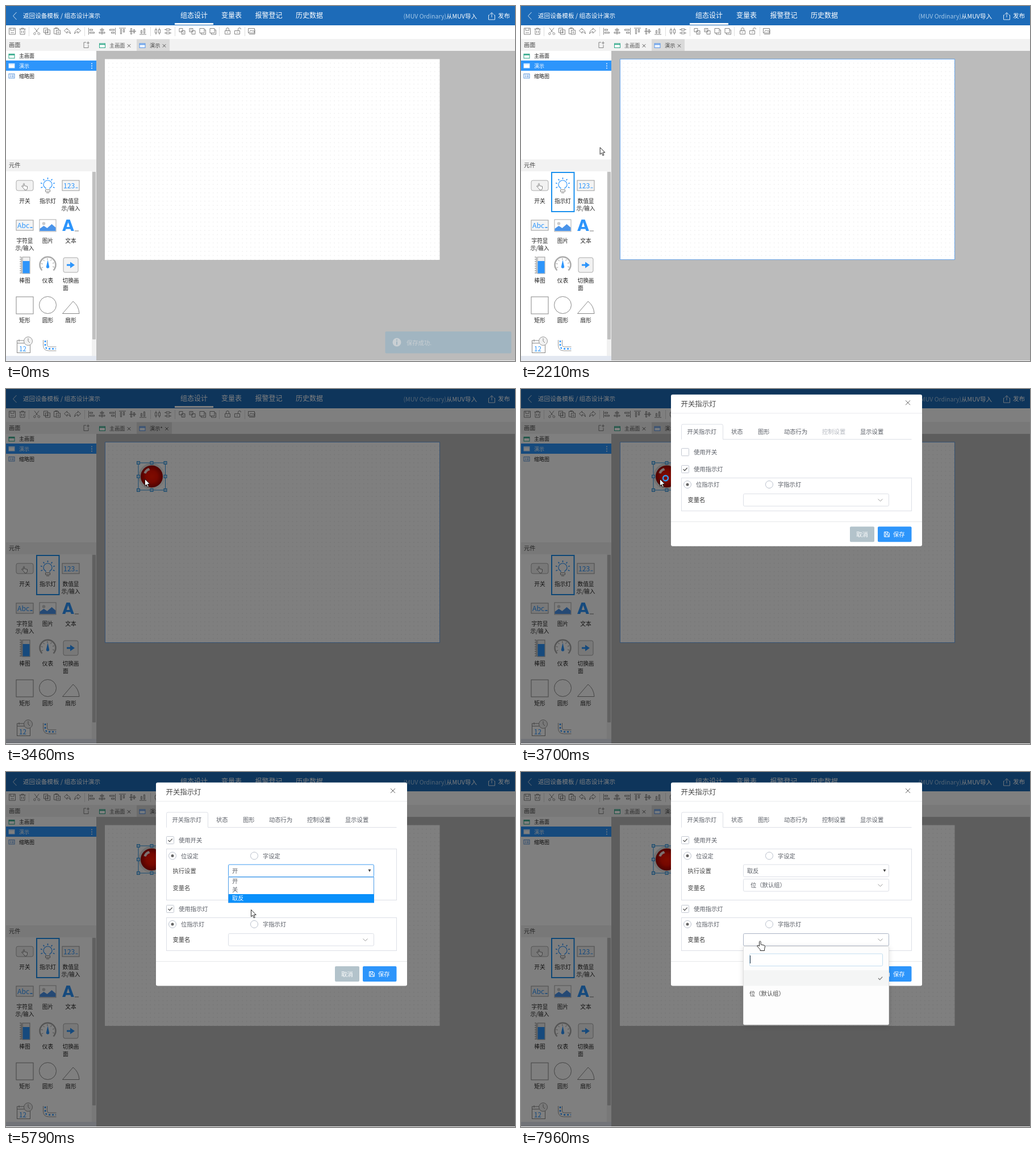
These frames come from a looping animation (896 px wide and 625 px high, 8 s). An HTML page:

```html
<!DOCTYPE html>
<html lang="zh-CN">
<head>
<meta charset="utf-8">
<title>组态设计演示</title>
<style>
html, body { margin: 0; width: 100%; height: 100%; overflow: hidden; background: #fff; }
svg { display: block; font-family: "Noto Sans CJK SC", "Noto Sans CJK", "Noto Sans", sans-serif; }
text { white-space: pre; }
#dd { filter: drop-shadow(0 2px 4px rgba(0,0,0,.14)); }
</style>
</head>
<body>
<svg id="stage" width="896" height="625"></svg>
<script>
const LOOP = 8000, BLUE = '#2d95fb', GREY = '#777', INK = '#5a5e66', EDGE = '#dcdfe6';
const stage = document.getElementById('stage');

// Markup helpers; text is placed by its vertical centre.
const T = (x, y, s, size = 10.3, fill = INK, extra = '') =>
  `<text x="${x}" y="${y + size * .37}" font-size="${size}" fill="${fill}" ${extra}>${s}</text>`;
const R = (x, y, w, h, fill, stroke = 'none', extra = '') =>
  `<rect x="${x}" y="${y}" width="${w}" height="${h}" fill="${fill}" stroke="${stroke}" ${extra}/>`;
const C = (x, y, r, fill, stroke = 'none', extra = '') =>
  `<circle cx="${x}" cy="${y}" r="${r}" fill="${fill}" stroke="${stroke}" ${extra}/>`;
const P = (d, stroke = GREY, extra = '') => `<path d="${d}" fill="none" stroke="${stroke}" ${extra}/>`;
const G = (x, y, body, extra = '') => `<g transform="translate(${x} ${y})" ${extra}>${body}</g>`;
const cross = (x, y, r, col = '#555') => P(`M${x - r} ${y - r}l${2 * r} ${2 * r}m0 ${-2 * r}l${-2 * r} ${2 * r}`, col);
const tick = (x, y, col) => P(`M${x - 3.5} ${y}l2.6 2.6 4.6 -5`, col, 'stroke-width="1.3"');

function header() {
  const nav = [[307, '组态设计'], [379, '变量表'], [438.5, '报警登记'], [510, '历史数据']];
  return R(0, 0, 896, 34, '#1d6bb8') + P('M18.5 11L12.5 17.5L18.5 24', '#d5e5f4') +
    T(30, 17, '返回设备模板 / 组态设计演示', 10.6, '#fff') +
    nav.map(([x, s]) => T(x, 17, s, 12, '#fff')).join('') + R(297, 30, 68, 3, '#fff') +
    T(775, 18, '(MUV Ordinary)', 10.6, '#a5c8e8', 'text-anchor="end"') +
    T(775, 18, '从MUV导入', 10.6, '#fff') +
    P('M851 16h-1.5v8h11v-8h-1.5M855 20v-8M851.8 15l3.2-3.5 3.2 3.5', '#dce9f5') +
    T(866, 17, '发布', 10.6, '#fff');
}

function toolbar() {
  const bars = 'M-5.5 -6v12M-3.5 -3.5h5v2h-5zM-3.5 1.5h8v2h-8z';
  const turned = (x, a, d) => G(x, 44.5, `<g transform="rotate(${a})">${P(d)}</g>`);
  const mid = 'M0 -6v12M-3 -3.5h6v2h-6zM-5 1.5h10v2h-10z';
  const pair = 'M-5 -5h6v6h-6zM-1 -1h6v6h-6z';
  const sheet = 'M-5 -5h8v8h-8zM-2.5 3v2.5h8v-8h-2.5';
  const lock = 'M-4.5 -1h9v6h-9zM0 1v2', bow = 'v-2.5a2.5 2.5 0 0 1 5 0';
  const icons = [
    [11, 'M-5.5 -5.5h11v11h-11zM-3 -5.5v4h6v-4M-3 2.5h6'],
    [29, 'M-5.5 -4h11M-2 -4v-1.5h4v1.5M-4 -4v9.5h8v-9.5M-1.5 -1v4M1.5 -1v4'],
    [54, 'M-4 -6l6 8M4 -6l-6 8M-2 3.5a1.8 1.8 0 1 1 -.1 -.2M5.5 3.5a1.8 1.8 0 1 1 -.1 -.2'],
    [72, 'M-5.5 -5.5h7v8h-7zM-2.5 -2.5h8v8h-8zM-.5 1.5h4M1.5 -.5v4'],
    [90, 'M-1.5 4.5h-4v-9.5h8v3M-3.5 -5v-1h4v1M-1.5 -2h7v7.5h-7zM.5 1h3M.5 3h3'],
    [108, 'M-5.5 -1l5 -4.5v2.5q5 0 6 7.5q-2.5 -4 -6 -4v3z'],
    [126, 'M5.5 -1l-5 -4.5v2.5q-5 0 -6 7.5q2.5 -4 6 -4v3z'],
    [151, bars], [169, mid],
    [267, 'M-4.5 -3h3v6h-3zM1.5 -3h3v6h-3zM-3 -6v3M-3 3v3M3 -6v3M3 3v3'],
    [285, 'M-3 -4.5h6v3h-6zM-3 1.5h6v3h-6zM-6 -3h3M3 -3h3M-6 3h3M3 3h3'],
    [310, pair + 'M1 4l3 -3'], [328, pair + 'M-4 -1l3 -3'], [346, sheet], [364, sheet],
    [390, lock + 'M-2.5 -1' + bow + 'v2.5'], [407, lock + 'M1.5 -1' + bow],
    [432, 'M-5.5 -5h11v8h-11zM-4 5h10v-8M-4 2l3 -4 2.5 2 1.5 -1.5 2 3']
  ];
  return R(0, 34, 896, 24, '#fff') + `<g stroke-width=".9">` +
    icons.map(([x, d]) => G(x, 44.5, P(d))).join('') +
    turned(187, 180, bars) + turned(205, 90, bars) + turned(223, 90, mid) + turned(241, -90, bars) + '</g>' +
    [40.5, 138.5, 254.5, 297.5, 375.5, 420.5].map(x => P(`M${x} 37v16`, '#ddd')).join('');
}

const win = (x, y, col, fill = '#fff') =>
  R(x - 5, y - 3.5, 10, 7.5, fill, col) + P(`M${x - 5} ${y - 2}h10`, col, 'stroke-width="1.6"');

function sidebar() {
  return R(0, 58, 896, 21, '#f2f2f2') + R(0, 79, 159, 546, '#fff') + T(5, 68.5, '画面', 10.2, '#444') +
    P('M141 64h-4v9.5h8v-5M142 65h5M144.5 62.5v5', GREY, 'stroke-width=".9"') +
    win(10, 88, '#2aa586') + T(23, 88, '主画面', 9, '#222') +
    R(0, 96, 159, 18, BLUE) + win(10, 105, '#d5eaff', '#fff') + T(23, 105.5, '演示', 9, '#fff') +
    [101.5, 105.5, 109.5].map(y => C(151, y, .9, '#fff')).join('') +
    R(5, 119.5, 10, 7.5, '#fff', '#5a96dc') + P('M7 122h2M10 122h3.5M7 124.5h2M10 124.5h3.5', '#3f83d8') +
    T(23, 123.5, '缩略图', 9, '#222') +
    R(0, 270, 159, 21, '#f2f2f2') + T(5, 280.5, '元件', 10.2, '#444') +
    R(151, 291, 8, 325, '#f1f1f1') + R(152, 292, 6, 295, '#c1c1c1', 'none', 'rx="1"') +
    R(0, 616, 159, 9, '#e3e8f1') + parts();
}

function parts() {
  const cols = [33, 73.5, 114], plate = R(-15, -9, 30, 18, '#f4f4f4', '#999');
  const ring = (n, f) => Array.from({ length: n }, (_, i) => f(i)).join('');
  const ray = (a, r, len, dy = 0) =>
    `M${Math.cos(a) * r} ${Math.sin(a) * r + dy}l${Math.cos(a) * len} ${Math.sin(a) * len}`;
  const icons = [
    [0, 316, R(-15, -9, 30, 18, '#f2f2f2', '#aaa', 'rx="3"') +
      '<path d="M-1.5 5.5l-4 -4q0 -1.5 2 -.5l1 1v-5q1 -1.5 2 0v3.5l5 1v4l-1.5 2.5h-3z" fill="#fff" stroke="#777" stroke-width=".9"/>'],
    [1, 316, P('M-3.5 6v-1.5q-4 -2.2 -4 -6a7.5 7.5 0 0 1 15 0q0 3.8 -4 6v1.5', BLUE, 'stroke-width="1.2"') +
      P(ring(7, i => ray(Math.PI * (i / 4.8 - 1.125), 10, 3, -1)), BLUE, 'stroke-width="1.5"') +
      P('M-4 7.5h8v3.5h-8zM-2.5 13h5', '#888')],
    [2, 316, plate + T(-13, .5, '123', 12.2, BLUE) + P('M8.5 4h4', BLUE)],
    [0, 386, plate + T(-13, .5, 'Abc', 12.2, BLUE) + P('M9.5 4h4', BLUE, 'stroke-width="1.6"')],
    [1, 386, R(-14.5, -10, 29, 21, '#fff', '#aaa') + C(-7, -3, 2.8, '#ccc') +
      '<path d="M-14 10v-4l7 -5 6 4 8 -7 7 6v6z" fill="#4a94ea"/>'],
    [2, 386, T(-15, -.5, 'A', 27, BLUE, 'font-weight="800" font-family="DejaVu Sans, sans-serif"') + P('M7 10h7', '#777')],
    [0, 456, R(-4, -14, 13, 29, '#f0f0f0', '#999') + R(-3.5, -7, 12, 21.5, BLUE) +
      P('M-6 -14v29' + ring(8, i => `M-9 ${-14 + i * 4}h3`), '#888')],
    [1, 456, P('M-10 9.5A14 14 0 1 1 10 9.5', '#aaa', 'stroke-width="2.5"') +
      P(ring(7, i => ray(2.7 + i * .65, 9, 3)), '#999') +
      `<path d="M0 -9l2.7 12a2.7 2.7 0 1 1 -5.4 0z" fill="${BLUE}"/>`],
    [2, 456, R(-13, -13, 26, 26, '#f2f2f2', '#aaa', 'rx="3"') + `<path d="M-7 -1.5h6v-4l8 5.5 -8 5.5v-4h-6z" fill="${BLUE}"/>`],
    [0, 526.5, R(-15, -14.5, 30, 30, '#fff', '#888')],
    [1, 526.5, C(0, 0, 15, '#fff', '#888')],
    [2, 526.5, P('M-14.5 15L4 -6.5Q14 1 15 15z', '#888')],
    [0, 597, R(-13.5, -8, 23, 21.5, '#fff', '#888') + P('M-13.5 -3.5h23M-10 -10v4', '#888') + T(-10, 6.5, '12', 11.5, BLUE) +
      C(6, -7, 7.5, '#f2f2f2', '#999') + P('M6 -12v5l3 3', '#888')],
    [1, 597, P('M-8 -9v9q0 10 10 10h13M-1 -9v9q0 3 4 3h12', '#999') +
      P('M-4.5 -8v8q0 6.5 6 6.5h13', BLUE, 'stroke-width="2.5" stroke-dasharray="3 3"')]
  ];
  const labels = [
    [343.5, '开关', '指示灯', '数值显'], [356, '', '', '示/输入'], [413.5, '字符显', '图片', '文本'], [426, '示/输入', '', ''],
    [483.5, '棒图', '仪表', '切换画'], [496, '', '', '面'], [553.5, '矩形', '圆形', '扇形']
  ];
  return icons.map(([c, y, s]) => G(cols[c], y, s)).join('') +
    labels.map(([y, ...row]) => row.map((s, c) =>
      s === '面' ? T(100, y, s, 9.7, '#222') : T(cols[c], y, s, 9.7, '#222', 'text-anchor="middle"')).join('')).join('');
}

function canvas() {
  const handles = [];
  for (const x of [233, 256.5, 280.5]) for (const y of [130, 154, 178])
    if (x !== 256.5 || y !== 154) handles.push(R(x - 2.5, y - 2.5, 5, 5, '#b5dbf7', '#2f95e0'));
  return R(159, 79, 737, 545, '#bbb') +
    win(169.5, 69.5, '#2aa586') + T(182, 69.5, '主画面', 9.2, '#555') + cross(216.5, 70, 2.7) +
    R(230, 58.5, 58, 20.5, '#dadada', 'none', 'id="tab"') + win(240, 69.5, '#5a96e6', '#eaf3ff') +
    T(253, 69.5, '演示<tspan id="star">*</tspan>', 9.2, '#444') + G(0, 0, cross(278.5, 70, 2.7), 'id="tabX"') +
    R(174, 93.5, 589.5, 353.5, '#fff') + R(174, 93.5, 589.5, 353.5, 'url(#dots)') +
    R(174.5, 93.5, 589, 353, 'none', '#6aa5e8', 'id="focus"') +
    G(256.5, 154, C(0, 0, 23.5, 'url(#rim)') + C(0, 0, 19.5, 'url(#red)') +
      '<path d="M-14 -6q2 -7 9 -9l2 4q-5 1 -7 6z" fill="#fff" opacity=".88"/>', 'id="lamp"') +
    `<g id="sel">${R(233, 130, 47.5, 48, 'none', '#2f95e0')}${handles.join('')}</g>` +
    R(54, 293, 39.5, 69, 'none', '#1a90ee', 'id="picked" stroke-width="2"') +
    `<g id="toast">${R(667.5, 573, 222, 38.5, '#a1b5c1', 'none', 'rx="2"')}${C(688, 592, 7.5, '#c9cfd3')}` +
    `${R(687, 590.5, 2, 6, '#a1b5c1')}${R(687, 587, 2, 2, '#a1b5c1')}${T(705, 593, '保存成功.', 10.3, '#c9cfd3')}</g>`;
}

const check = (y, id) => R(282.5, y - 6.5, 13, 13, '#fff', '#c3c8d2', 'rx="1"') +
  `<g id="${id}">${tick(289, y, '#555')}</g>`;
const radios = (y, a, b) => C(293, y, 6.5, '#fff', '#b9c0cc') + C(293, y, 2.5, '#666') + T(308, y + .5, a) +
  C(437, y, 6.5, '#fff', '#b9c0cc') + T(452, y + .5, b);
const field = (y, id) => R(391.5, y, 256, 21.5, '#fff', EDGE, `rx="2" id="${id}"`) +
  P(`M628.5 ${y + 9}l4 4 4 -4`, '#999');

function modal() {
  const tabs = [[292.5, '开关指示灯'], [370, '状态'], [417, '图形'], [463, '动态行为'], [530, '控制设置', 'id="ctrl"'], [597, '显示设置']];
  const top = R(264, 18.5, 442, 358, '#fff', 'none', 'rx="3" id="panel"') + T(281.5, 35.5, '开关指示灯', 12.4, '#444') +
    cross(681, 33, 4, '#666') + P('M264 51.5h442', '#e9ebee') +
    P('M282 97.5h.5v-24q0 -2.5 2.5 -2.5h68q2.5 0 2.5 2.5v24H687.5', EDGE) +
    tabs.map(([x, s, e]) => T(x, 84.5, s, 10.3, INK, e)).join('') + check(120, 'useSwitch') + T(304, 120.5, '使用开关');
  const setup = R(282.5, 135.5, 405, 90, 'none', EDGE) + radios(147.5, '位设定', '字设定') +
    T(293.5, 174.5, '执行设置', 10.3, '#444') + R(391.5, 163, 256, 21.5, '#fff', EDGE, 'rx="2" id="mode"') +
    T(398, 174, '开', 10.3, INK, 'id="modeText"') + '<path d="M637.5 171.5h5l-2.5 4.5z" fill="#444"/>' +
    T(293.5, 204, '变量名', 10.3, '#444') + field(188.5, 'varA') + T(404, 199, '位（默认组）', 10.3, INK, 'id="varText"');
  const lower = check(241, 'useLamp') + T(304, 241.5, '使用指示灯') + R(282.5, 256.5, 405, 58, 'none', EDGE) +
    radios(268, '位指示灯', '字指示灯') + T(293.5, 295.5, '变量名', 10.3, '#333') + field(284.5, 'varB') +
    P('M264 333.5h442', '#e6e8ea') + R(579, 342, 43, 27, '#b3c3cb', 'none', 'rx="2"') +
    T(600.5, 356, '取消', 10.3, '#fff', 'text-anchor="middle" font-weight="500"') + R(628, 342, 59.5, 27, BLUE, 'none', 'rx="2"') +
    P('M639.5 351.5h6.5l2.5 2.5v6h-9zM641.5 351.5v3h4v-3M641.5 360v-3.5h5v3.5', '#fff') +
    T(655, 356, '保存', 10.3, '#fff', 'font-weight="500"');
  const list = R(391.5, 185, 256, 45, '#fff', '#4d9ce8') + R(392, 185, 256, 15, '#0a90fb', 'none', 'id="hot"') +
    ['开', '关', '取反'].map((s, i) => T(398, 192.5 + 15 * i, s, 10.3, INK, `id="opt${i}"`)).join('');
  const drop = R(391.5, 307, 256, 138, '#fdfdfd', '#dedede', 'rx="2" id="ddPanel"') +
    R(402.5, 320, 234, 21.5, '#fff', '#c2ddf0', 'rx="2"') + P('M403.5 323v14', '#234') +
    R(392, 349, 255, 27.5, '#f4f5f5', 'none', 'id="ddHot"') + tick(632.5, 363, '#777') + T(402, 390.5, '位（默认组）', 10.3, '#444');
  return `<g id="modal">${top}<g id="setup">${setup}</g><g id="lower">${lower}</g><g id="list">${list}</g><g id="dd">${drop}</g></g>`;
}

stage.innerHTML = `<defs>
  <pattern id="dots" x="177" y="97" width="7.36" height="7.36" patternUnits="userSpaceOnUse">${R(3.2, 3.2, 1, 1, '#d6d6d6')}</pattern>
  <radialGradient id="red"><stop offset="0" stop-color="#ff1800"/><stop offset=".5" stop-color="#ee1000"/><stop offset="1" stop-color="#9c0500"/></radialGradient>
  <linearGradient id="rim" x2="1" y2="1"><stop offset="0" stop-color="#dcdcdc"/><stop offset="1" stop-color="#f5f5f5"/></linearGradient>
</defs>` + header() + toolbar() + sidebar() + canvas() + R(0, 0, 896, 624, '#000', 'none', 'id="dim" opacity=".5"') +
  R(0, 624, 896, 1, '#f4f4f4') + modal() +
  `<g id="cursor"><path id="arrow" d="M.5 .5v12.3l2.8 -2.6 2 4.6 2 -.9 -2 -4.4h3.9z" fill="#fff" stroke="#111" stroke-width=".9"/>
  <path id="hand" d="M.5 9.5V1.7q1.3 -2 2.6 0v5l6 1.4q1.6 .6 1.4 2.4l-.9 4.3v2.7H2v-2L-3 10q-.8 -1.7 1.2 -1.7z" fill="#fff" stroke="#111" stroke-width=".9"/>
  <circle id="busy" cx="10.5" cy="-1" r="4.5" fill="none" stroke="#2f9cf0" stroke-width="2.4"/></g>`;

const el = {};
stage.querySelectorAll('[id]').forEach(n => el[n.id] = n);
const show = (id, on) => el[id].setAttribute('display', on ? 'inline' : 'none');
const set = (id, k, v) => el[id].setAttribute(k, v);
const clamp = v => Math.max(0, Math.min(1, v));

// Pointer stops: time, x, y
const path = [
  [200, 300, 640], [910, 98, 351], [1370, 71, 323], [1750, 67, 310], [1910, 67, 310], [2600, 244, 158],
  [3700, 244, 158], [4240, 334, 147], [4320, 334, 147], [4620, 287, 117], [4870, 287, 117], [5330, 443, 174],
  [5630, 443, 174], [5790, 431, 242], [6100, 420, 219], [6480, 420, 219], [6640, 425, 198], [6940, 425, 198], [7560, 419, 297]
];
function pointer(t) {
  const i = path.findIndex(p => p[0] > t);
  if (i === 0) return path[0].slice(1);
  if (i < 0) return path[path.length - 1].slice(1);
  const [t0, x0, y0] = path[i - 1], [t1, x1, y1] = path[i], p = (t - t0) / (t1 - t0), e = p * p * (3 - 2 * p);
  return [x0 + (x1 - x0) * e, y0 + (y1 - y0) * e];
}

function draw(t) {
  const within = (a, b = LOOP) => t >= a && t < b;
  set('toast', 'opacity', 1 - clamp((t - 130) / 420));

  show('picked', within(1500));
  show('focus', within(1500, 3780));
  show('lamp', within(2580));
  show('sel', within(2750));
  const dirty = within(2750);
  show('star', dirty);
  set('tab', 'width', dirty ? 62 : 58);
  set('tabX', 'transform', `translate(${dirty ? 4.5 : 0} 0)`);

  show('dim', within(3460));
  const slide = clamp((t - 3510) / 300);
  show('modal', within(3510));
  set('modal', 'opacity', clamp((t - 3510) / 150));
  set('modal', 'transform', `translate(0 ${-67 * (1 - slide) ** 2})`);

  const open = within(4870);
  show('setup', open);
  show('useSwitch', open);
  set('panel', 'height', open ? 358 : 267);
  set('lower', 'transform', `translate(0 ${open ? 0 : -91})`);
  set('ctrl', 'fill', open ? INK : '#b4b8bf');

  const [x, y] = pointer(t);
  const row = within(5630, 5680) ? 0 : within(5680, 5740) ? 1 : 2;
  show('list', within(5630, 6330));
  set('hot', 'y', 185 + 15 * row);
  for (let i = 0; i < 3; i++) set('opt' + i, 'fill', i === row ? '#fff' : INK);
  set('mode', 'stroke', within(5630, 6640) ? '#3f9bf0' : EDGE);
  el.modeText.textContent = within(6330) ? '取反' : '开';

  const first = within(6720, 7620), second = within(7960);
  show('dd', first || second);
  set('dd', 'transform', `translate(0 ${first ? -96 : 0})`);
  set('ddPanel', 'height', first ? 146 : 138);
  set('ddHot', 'y', first && y > 278 ? 376.5 : 349);
  set('varA', 'stroke', first ? '#a9b3c4' : EDGE);
  set('varB', 'stroke', second ? '#a9b3c4' : EDGE);
  show('varText', within(7620));

  const hand = within(4500, 4950) || within(6640);
  set('cursor', 'transform', `translate(${x} ${y})`);
  show('arrow', !hand);
  show('hand', hand);
  show('busy', within(3540, 3820));
}

function frame(now) {
  draw(now % LOOP);
  requestAnimationFrame(frame);
}
draw(0);
requestAnimationFrame(frame);
</script>
</body>
</html>
```
